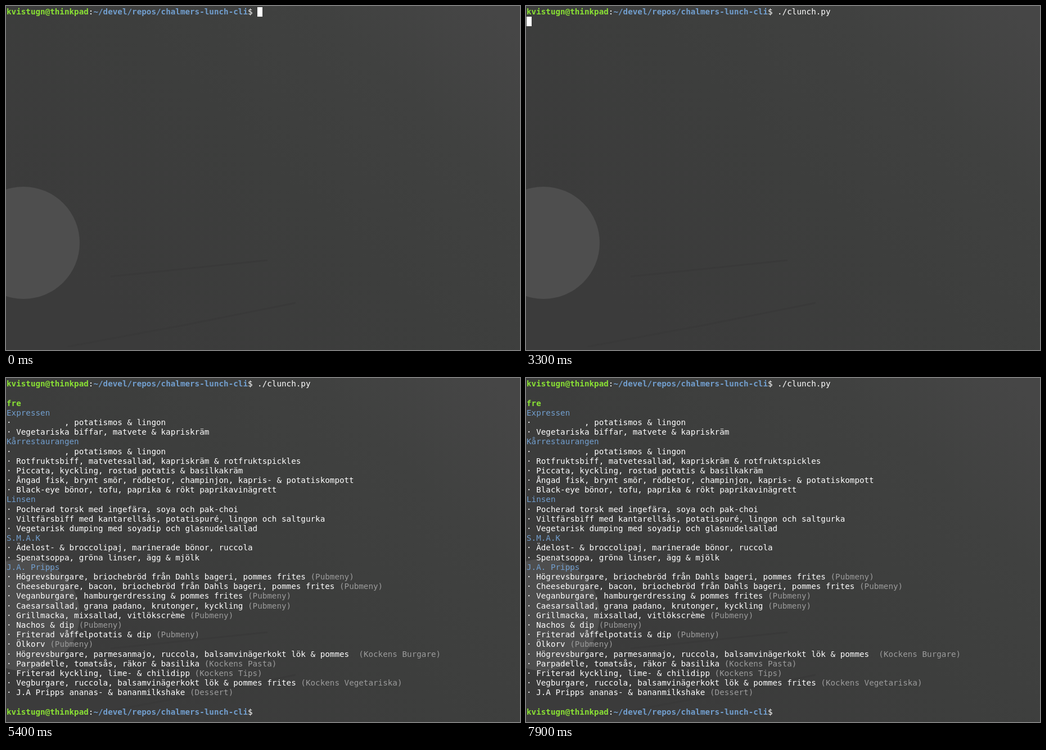
An HTML page that plays this animation: 914 by 613 pixels, repeating every 8000 ms.

```html
<!DOCTYPE html>
<html lang="sv">
<head>
<meta charset="utf-8">
<style>
  html, body { margin: 0; height: 100%; overflow: hidden; background: #3c3c3c; }
  svg { display: block; }
  text { font: 14.25px "DejaVu Sans Mono", monospace; fill: #fff; white-space: pre; }
  .bold { font-weight: bold; }
  .green { fill: #8ae234; }
  .blue { fill: #729fcf; }
  .dim { fill: #9c9c9c; }
</style>
</head>
<body>
<svg width="914" height="613" viewBox="0 0 914 613">
  <defs>
    <linearGradient id="wall" gradientUnits="userSpaceOnUse" x1="190" y1="560" x2="800" y2="-60">
      <stop offset="0" stop-color="#3b3b3b"/>
      <stop offset=".45" stop-color="#3d3e3d"/>
      <stop offset=".75" stop-color="#404140"/>
      <stop offset="1" stop-color="#464646"/>
    </linearGradient>
  </defs>
  <rect width="914" height="613" fill="url(#wall)"/>
  <path d="M186 482L465 453M110 607L320 568L515 529" fill="none" stroke="#383838" stroke-width="3" opacity=".6"/>
  <circle cx="31" cy="422" r="100" fill="#4e4e4e"/>
  <g id="prompt"></g>
  <g id="command"></g>
  <g id="output"></g>
  <rect id="cursor" width="9" height="17" fill="#fff"/>
</svg>
<script>
const LOOP = 8000, COL = 8.579, ROW = 17.19;
const $ = id => document.getElementById(id);

const menu = `
!fre
#Expressen
Köttbullar, potatismos & lingon
Vegetariska biffar, matvete & kapriskräm
#Kårrestaurangen
Köttbullar, potatismos & lingon
Rotfruktsbiff, matvetesallad, kapriskräm & rotfruktspickles
Piccata, kyckling, rostad potatis & basilkakräm
Ångad fisk, brynt smör, rödbetor, champinjon, kapris- & potatiskompott
Black-eye bönor, tofu, paprika & rökt paprikavinägrett
#Linsen
Pocherad torsk med ingefära, soya och pak-choi
Viltfärsbiff med kantarellsås, potatispuré, lingon och saltgurka
Vegetarisk dumping med soyadip och glasnudelsallad
#S.M.A.K
Ädelost- & broccolipaj, marinerade bönor, ruccola
Spenatsoppa, gröna linser, ägg & mjölk
#J.A. Pripps
Högrevsburgare, briochebröd från Dahls bageri, pommes frites (Pubmeny)
Cheeseburgare, bacon, briochebröd från Dahls bageri, pommes frites (Pubmeny)
Veganburgare, hamburgerdressing & pommes frites (Pubmeny)
Caesarsallad, grana padano, krutonger, kyckling (Pubmeny)
Grillmacka, mixsallad, vitlökscrème (Pubmeny)
Nachos & dip (Pubmeny)
Friterad våffelpotatis & dip (Pubmeny)
Ölkorv (Pubmeny)
Högrevsburgare, parmesanmajo, ruccola, balsamvinägerkokt lök & pommes  (Kockens Burgare)
Parpadelle, tomatsås, räkor & basilika (Kockens Pasta)
Friterad kyckling, lime- & chilidipp (Kockens Tips)
Vegburgare, ruccola, balsamvinägerkokt lök & pommes frites (Kockens Vegetariska)
J.A Pripps ananas- & bananmilkshake (Dessert)`.split("\n");

const span = (style, text) => `<tspan class="${style}">${text}</tspan>`;
const line = (row, text, col = 0) =>
  `<text x="${1 + col * COL}" y="${15.2 + row * ROW}">${text}</text>`;
const prompt = row => line(row, span("bold green", "kvistugn@thinkpad") + ":" +
  span("bold blue", "~/devel/repos/chalmers-lunch-cli") + "$");

function menuLine(text) {
  text = text.replace("&", "&amp;");
  if (text[0] === "!") return span("bold green", text.slice(1));
  if (text[0] === "#") return span("blue", text.slice(1));
  return "· " + text.replace(/\(.*\)/, note => span("dim", note))
    .replace("Köttbullar", word => span("blink", word));
}

$("prompt").innerHTML = prompt(0);
$("command").innerHTML = line(0, "./clunch.py", 52);
$("output").innerHTML =
  menu.map((text, i) => text && line(i + 1, menuLine(text))).join("") + prompt(34);
const blinking = document.querySelectorAll(".blink");

// start, end, column, row
const cursorShown = [
  [0, 50, 52, 0], [700, 1300, 63, 0], [2500, 2700, 0, 1], [3300, 3950, 0, 1],
  [4500, 5150, 52, 34], [6100, 6350, 52, 34], [7000, 7600, 52, 34]
];
const wordHidden = [[4200, 4850], [5400, 6100], [6700, 7300], [7900, LOOP]];

const show = (element, on) => element.style.visibility = on ? "visible" : "hidden";

function draw() {
  const t = performance.now() % LOOP;
  const active = ([start, end]) => t >= start && t < end;
  const cursor = cursorShown.find(active);
  const word = t >= 3950 && !wordHidden.some(active);

  show($("command"), t >= 250);
  show($("output"), t >= 3950);
  blinking.forEach(element => show(element, word));
  show($("cursor"), cursor);
  if (cursor) {
    $("cursor").setAttribute("x", Math.round(1 + cursor[2] * COL));
    $("cursor").setAttribute("y", Math.round(2 + cursor[3] * ROW));
  }
  requestAnimationFrame(draw);
}
draw();
</script>
</body>
</html>
```
